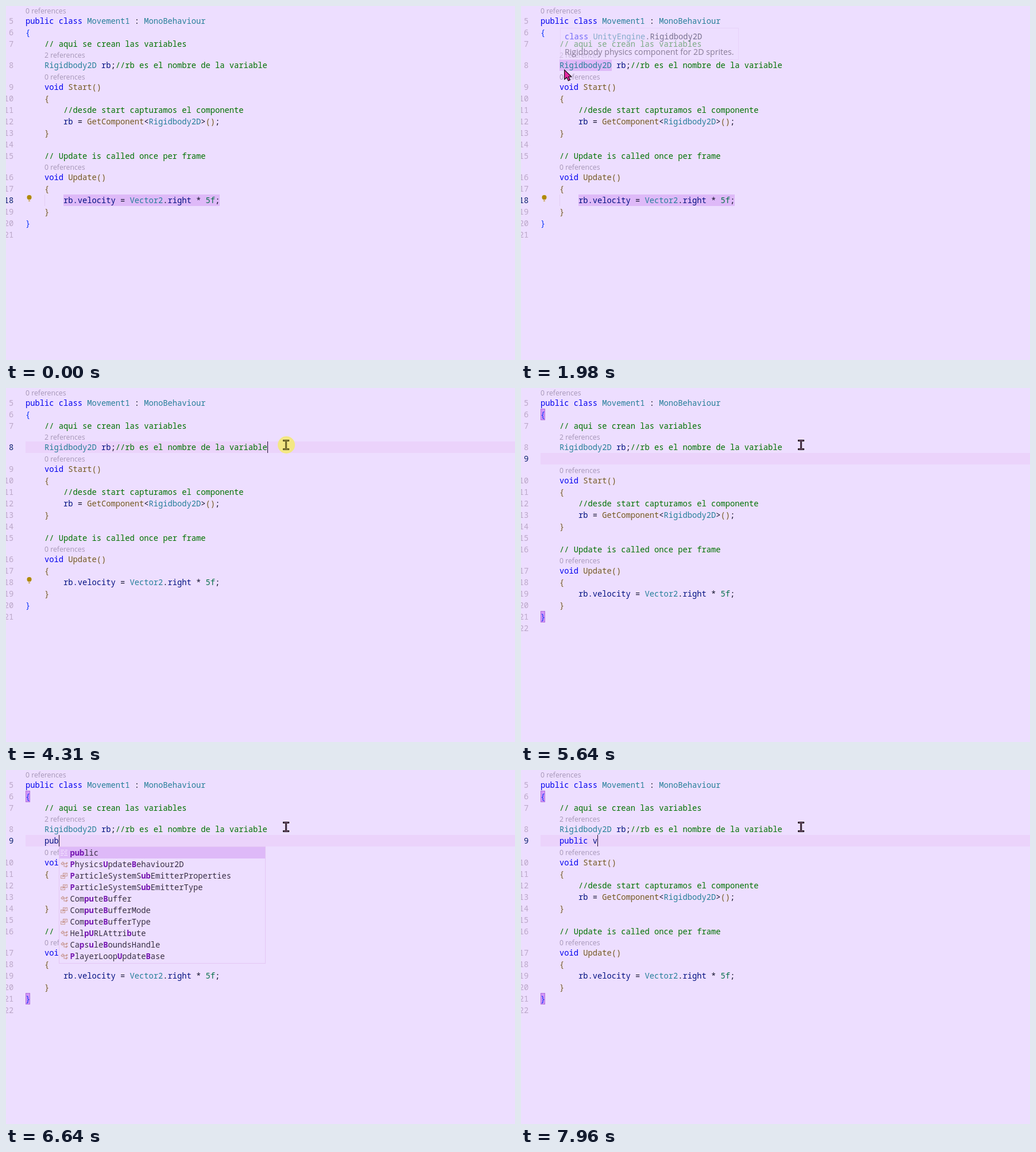
Animation of 886x616 px, one loop 8 s. Source, as an HTML page with a canvas:

```html
<!DOCTYPE html>
<html lang="es">
<head>
<meta charset="utf-8">
<title>Code editor</title>
<style>
html, body { margin: 0; width: 100%; height: 100%; overflow: hidden; background: #eddeff; }
canvas { display: block; }
</style>
</head>
<body>
<canvas id="stage" width="886" height="616"></canvas>
<script>
const ctx = document.getElementById('stage').getContext('2d');
const LOOP = 8000, CHAR = 8.25;
const MONO = '"Noto Sans Mono", "DejaVu Sans Mono", monospace';
const SANS = '"Open Sans", "Noto Sans", sans-serif';
const CODE = '13.75px ' + MONO;
const BG = '#eddeff', SELECT = '#deb9f8', LINE = '#ebd3fb', DIM = '#a596b6';

// Colour codes used after "~" in the code lines
const INK = { k: '#0000f0', t: '#267f99', c: '#007200', m: '#74591f', v: '#001080',
              n: '#07704a', b: '#0431fa', o: '#10102a' };

// [indent, code, references shown above]
const rows = [
  [0, '~kpublic class ~tMovement1~o : ~tMonoBehaviour', 0],
  [0, '~b{'],
  [1, '~c// aqui se crean las variables'],
  [1, '~tRigidbody2D~v rb~o;~c//rb es el nombre de la variable', 2],
  [1, '~kvoid ~mStart()', 0],
  [1, '~m{'],
  [2, '~c//desde start capturamos el componente'],
  [2, '~vrb~o = ~mGetComponent~o<~tRigidbody2D~o>~m()~o;'],
  [1, '~m}'],
  [0, ''],
  [1, '~c// Update is called once per frame'],
  [1, '~kvoid ~mUpdate()', 0],
  [1, '~m{'],
  [2, '~vrb.velocity~o = ~tVector2~o.~vright~o * ~n5f~o;'],
  [1, '~m}'],
  [0, '~b}'],
  [0, '']
];

// [time, kind, left, top]
const pointer = [
  [0], [330, 'beam', 319, 319], [660, 'beam', 143, 119], [990, 'arrow', 120, 110],
  [1320, 'beam', 86, 93], [1650, 'beam', 72, 97], [1980, 'arrow', 75, 110],
  [2310, 'beam', 129, 219], [2640, 'beam', 463, 575], [2970, 'beam', 300, 309],
  [3320, 'beam', 320, 314], [3650, 'beam', 164, 96], [3980, 'beam', 240, 92],
  [4310, 'beam', 482, 90]
];
const typing = [[0, ''], [6310, 'p'], [6640, 'pub'], [6970, 'publi'], [7300, 'public '], [7960, 'public v']];

// [icon, label, detail]
const suggestions = {
  p: [
    ['key', 'partial'], ['key', 'private'], ['key', 'protected'], ['key', 'public'],
    ['snip', 'prop', 'prop'], ['snip', 'propfull', 'Property and backing field'],
    ['snip', 'propg', 'propg'], ['space', 'Packages'], ['struct', 'ParticleCollisionEvent'],
    ['class', 'ParticlePhysicsExtensions'], ['class', 'ParticleSystem'],
    ['enum', 'ParticleSystemAnimationMode']
  ],
  pub: [
    ['key', 'public'], ['class', 'PhysicsUpdateBehaviour2D'],
    ['enum', 'ParticleSystemSubEmitterProperties'], ['enum', 'ParticleSystemSubEmitterType'],
    ['class', 'ComputeBuffer'], ['enum', 'ComputeBufferMode'], ['enum', 'ComputeBufferType'],
    ['class', 'HelpURLAttribute'], ['class', 'CapsuleBoundsHandle'], ['class', 'PlayerLoopUpdateBase']
  ],
  publi: [['key', 'public']]
};

const at = (list, t) => list.filter(step => step[0] <= t).pop();

function rect(color, x, y, w, h) {
  ctx.fillStyle = color;
  ctx.fillRect(x, y, w, h);
}

function frame(color, x, y, w, h) {
  ctx.strokeStyle = color;
  ctx.lineWidth = 1;
  ctx.strokeRect(x + .5, y + .5, w - 1, h - 1);
}

function text(str, x, y, color, font = CODE, align = 'left') {
  ctx.font = font;
  ctx.fillStyle = color;
  ctx.textAlign = align;
  ctx.fillText(str, x, y);
}

function code(str, x, y) {
  for (const part of str.split('~').slice(1)) {
    text(part.slice(1), x, y, INK[part[0]]);
    x += (part.length - 1) * CHAR;
  }
}

function bulb() {
  ctx.fillStyle = '#b08a00';
  ctx.beginPath();
  ctx.arc(40.5, 333, 4, 0, 7);
  ctx.fill();
  rect('#b08a00', 38.5, 335, 4, 2);
  rect('#c9a860', 39, 338, 3, 2);
}

function bracketBox(y) {
  rect('#d294f8', 34, y, 8, 20);
  frame('#b070dc', 34, y, 8, 20);
}

function tooltip() {
  ctx.globalAlpha = .52;
  rect(BG, 68, 38, 311, 56);
  frame('#e3c8f4', 68, 38, 311, 56);
  code('~kclass ~tUnityEngine~o.Rigidbody2D', 76, 58);
  text('Rigidbody physics component for 2D sprites.', 76, 85, '#2c2238', '14.2px ' + SANS);
  ctx.globalAlpha = 1;
}

function icon(kind, x, y, selected) {
  const color = selected ? '#f6eaff' : '#4a4058', tan = '#c99a94';
  if (kind === 'key') {
    for (const [dx, dy, w] of [[0, 0, 6], [8, 0, 4], [0, 3, 4], [6, 3, 5], [0, 6, 6], [8, 6, 3], [0, 9, 4], [6, 9, 6]])
      rect(color, x + dx, y + dy, w, 1);
  } else if (kind === 'snip') {
    frame(color, x + 1, y, 11, 10);
  } else if (kind === 'space') {
    text('{}', x, y + 9, color, '10.5px ' + MONO);
  } else if (kind === 'struct') {
    frame(color, x, y, 12, 4);
    frame(color, x, y + 6, 4, 4);
    frame(color, x + 8, y + 6, 4, 4);
  } else if (kind === 'class') {
    ctx.strokeStyle = tan;
    ctx.lineWidth = 1.2;
    ctx.stroke(new Path2D(`M${x + 1} ${y + 4}l3-3 2 2-3 3zM${x + 5} ${y + 4}h4M${x + 6} ${y + 4}v5h3M${x + 9} ${y + 4}l2-2 1 1-2 2zM${x + 9} ${y + 9}l2-2 1 1-2 2z`));
  } else {
    frame(tan, x + 4, y, 8, 6);
    frame(tan, x, y + 4, 8, 6);
    rect(tan, x + 2, y + 6, 4, 1);
    rect(tan, x + 6, y + 2, 4, 1);
  }
}

function popup(typed, left) {
  const list = suggestions[typed];
  if (!list) return;
  const bottom = 136 + list.length * 20;
  rect(BG, left, 133, 360, bottom - 132);
  rect(SELECT, left + 1, 134, 358, 20);
  if (list.length > 10) rect('#dab4f7', left + 351, 134, 8, 20);
  frame('#e4c6f4', left, 133, 360, bottom - 132);
  list.forEach(([kind, label, detail], i) => {
    const y = 149 + i * 20;
    icon(kind, left + 3, y - 10, !i);
    let hit = 0;
    [...label].forEach((ch, n) => {
      const match = ch.toLowerCase() === typed[hit];
      if (match) hit++;
      text(ch, left + 19.6 + n * CHAR, y, match ? '#7414b0' : '#382f44', (match ? 'bold ' : '') + CODE);
    });
    if (detail) text(detail, left + 351, y - 1, '#54485f', '11.7px ' + MONO, 'right');
  });
}

function arrow(x, y) {
  const shape = new Path2D(`M${x + .7} ${y + 1.2}v16.5l4-3.6 2.6 6 3-1.3-2.5-5.8h5z`);
  ctx.fillStyle = '#e82aa4';
  ctx.strokeStyle = '#000';
  ctx.lineWidth = 1.1;
  ctx.fill(shape);
  ctx.stroke(shape);
}

function beam(x, y, pressed) {
  if (pressed) {
    ctx.fillStyle = '#f3e783';
    ctx.beginPath();
    ctx.arc(488, 99, 15, 0, 7);
    ctx.fill();
  }
  const edge = pressed ? '#4d471c' : '#000', core = pressed ? '#a89c45' : '#a5709a';
  rect(edge, x, y, 11, 3);
  rect(edge, x, y + 15, 11, 3);
  rect(edge, x + 4, y + 2, 3, 14);
  rect(core, x + 1, y + 1, 9, 1);
  rect(core, x + 1, y + 16, 9, 1);
  rect(core, x + 5, y + 2, 1, 14);
}

function draw(t) {
  const clicked = t >= 4310, matched = t >= 4650, entered = t >= 5310;
  const hover = t >= 1980 && t < 2310;
  const typed = at(typing, t)[1];
  const current = entered ? 9 : clicked ? 8 : 18;
  const lines = rows.slice();
  if (entered) lines.splice(4, 0, [1, /public/.test(typed) ? '~kpublic~v' + typed.slice(6) : '~v' + typed]);

  rect(BG, 0, 0, 886, 616);
  if (clicked) rect(LINE, 34, entered ? 113 : 93, 852, 20);
  else {
    rect(SELECT, 100, 328, 272, 20);
    rect('#e2cdf3', 67, 328, 1, 20);
  }
  if (hover) rect(SELECT, 67, 93, 91, 20);
  if (matched) {
    bracketBox(36);
    bracketBox(entered ? 388 : 368);
  } else bulb();

  let top = 0;
  lines.forEach(([indent, str, refs], i) => {
    const x = 34 + indent * 4 * CHAR, n = i + 5;
    if (refs !== undefined) {
      top += i === 0 ? 16 : n === 8 || n > 14 ? 17 : 18;
      text(refs + ' references', x, top - 3, DIM, '12.25px ' + SANS);
    }
    text(n, 13.3, top + 15, n === current ? '#0b216f' : '#bba8c8', CODE, 'right');
    code(str, x, top + 15);
    top += 20;
  });

  const caretX = entered ? Math.floor(67.4 + typed.length * CHAR) : 455;
  const caretOn = clicked && !(t >= 4980 && t < 5310) && !(t >= 5640 && t < 6310);
  if (hover) tooltip();
  popup(typed, caretX);
  if (caretOn) rect('#1c1030', caretX, entered ? 113 : 93, 1, 20);

  const [, kind, px, py] = at(pointer, t);
  if (kind === 'arrow') arrow(px, py);
  if (kind === 'beam') beam(px, py, clicked && !matched);
}

const start = performance.now();
function tick() {
  draw((performance.now() - start) % LOOP);
  requestAnimationFrame(tick);
}
tick();
</script>
</body>
</html>
```
